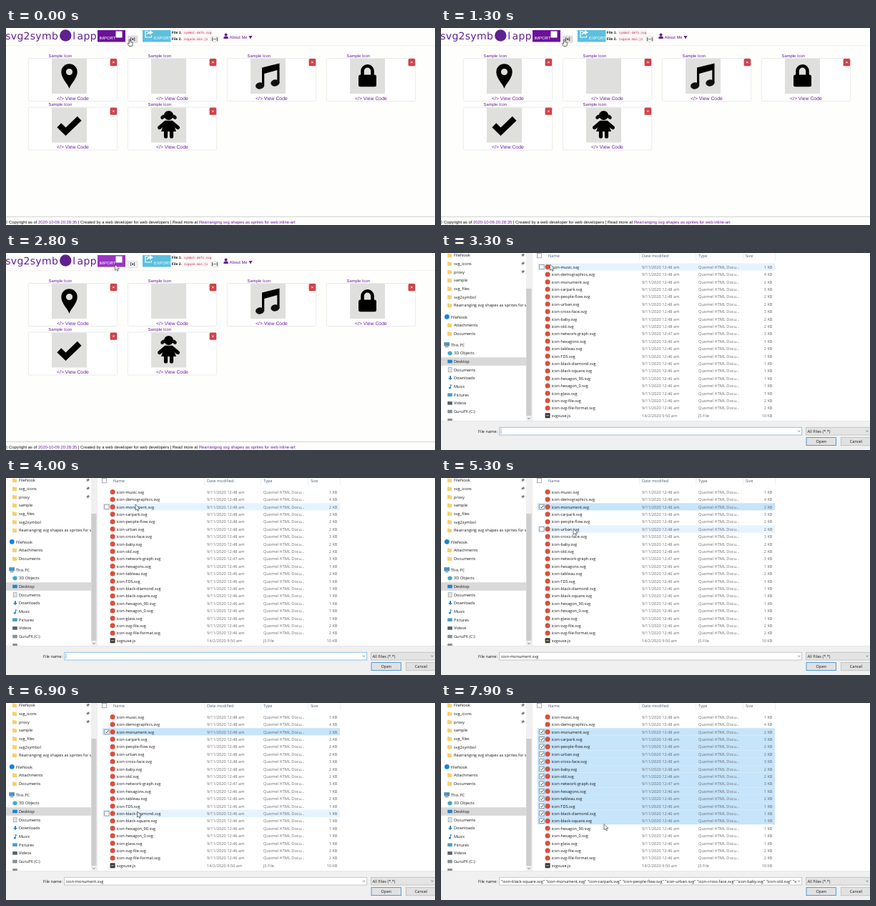
These frames come from a looping animation (600x276 px, 8000 ms). An HTML page:

```html
<!DOCTYPE html>
<html lang="en">
<head>
<meta charset="utf-8">
<title>Icon import</title>
<style>
html, body { margin: 0; width: 100%; height: 100%; overflow: hidden; background: #fff; }
svg { display: block; width: 600px; height: 276px; }
text { text-rendering: geometricPrecision; white-space: pre; }
#page { font: 5.85px "Liberation Sans", Arial, sans-serif; fill: #111; }
#dialog { font: 5.65px "Open Sans", "Noto Sans", sans-serif; fill: #1a1a1a; }
.link { fill: #6a1b9a; }
.white { fill: #fff; }
.logo { font: 14px "DejaVu Sans", sans-serif; letter-spacing: .3px; fill: #61208f; }
.code { font: 4.25px "DejaVu Sans Mono", monospace; fill: #c7254e; }
.bold { font-weight: bold; font-size: 5px; }
.view { font-size: 6.85px; }
.dim { fill: #6d6d6d; }
.head { fill: #4c607a; }
.end { text-anchor: end; }
.mid { text-anchor: middle; }
</style>
</head>
<body>
<svg viewBox="0 0 600 276" xmlns="http://www.w3.org/2000/svg">
  <defs>
    <clipPath id="sideClip"><rect width="119" height="235"/></clipPath>
    <clipPath id="fieldClip"><rect x="83" y="244" width="414" height="12"/></clipPath>
  </defs>
  <g id="page"></g>
  <g id="dialog"></g>
  <g id="cursor" stroke-linejoin="round">
    <path id="arrow" d="M0 0V8.2L2 6.5 3.3 9.4 4.6 8.8 3.4 6H6Z" fill="#fff" stroke="#222" stroke-width=".6"/>
    <path id="hand" d="M-.8 .4Q0-.6.8.4V3.6L4 4.3V7L3.2 9.4H-1L-3 6 -2.2 5.2 -.8 6Z" fill="#fff" stroke="#222" stroke-width=".7"/>
  </g>
</svg>
<script>
const $ = id => document.getElementById(id);
const rect = (x, y, w, h, fill, more = '') =>
  `<rect x="${x}" y="${y}" width="${w}" height="${h}" fill="${fill}" ${more}/>`;
const text = (x, y, str, cls = '') => `<text x="${x}" y="${y}" class="${cls}">${str}</text>`;
const path = (d, fill, more = '') => `<path d="${d}" fill="${fill}" ${more}/>`;
const dot = (x, y, r, fill) => `<circle cx="${x}" cy="${y}" r="${r}" fill="${fill}"/>`;
const oval = (x, y, rx, ry, turn) =>
  `<ellipse rx="${rx}" ry="${ry}" transform="translate(${x} ${y}) rotate(${turn})"/>`;
const border = (color, width = .7) => `stroke="${color}" stroke-width="${width}"`;
const show = (el, on) => el.setAttribute('visibility', on ? 'visible' : 'hidden');

const article = 'Rearranging svg shapes as sprites for web inline-art';

// ---- Web page ----
const icons = {
  pin: path('M0 17.2C-2.5 10-11.2 3.5-11.2-6a11.2 11.2 0 0 1 22.4 0C11.2 3.5 2.5 10 0 17.2ZM-4.6-6a4.6 4.6 0 0 0 9.2 0a4.6 4.6 0 0 0-9.2 0Z', '#000', 'fill-rule="evenodd"'),
  blank: '',
  note: path('M-8.5-12L16-18V10H12.8V-8.5L-5.3-3.5V14H-8.5Z', '#000') +
    oval(-11.4, 13.4, 6.1, 4.7, -8) + oval(9.9, 9.4, 6.1, 4.7, -8),
  lock: rect(-12.5, -2, 25, 16.7, '#000', 'rx="2.5"') +
    path('M-7 0V-7.2a7 7 0 0 1 14 0V0', 'none', border('#000', 4.6)),
  check: path('M-14.2 .3L-5 9.3 14.2-9.3', 'none', border('#000', 8.3)),
  girl: dot(0, -13.6, 6.5, '#000') + oval(-8, -11.3, 3.6, 2.5, -40) + oval(8, -11.3, 3.6, 2.5, 40) +
    path('M-5-6.3H5L10.5 9H-10.5Z', '#000') +
    path('M-4.5-3.5L-12.8 3.5M4.5-3.5L12.8 3.5M-4 8V16M4 8V16', 'none', border('#000', 5.2) + ' stroke-linecap="round"')
};

function card(name, i) {
  const x = 31 + 139 * (i % 4), y = i < 4 ? 42.5 : 111;
  return text(x + 28.5, y - 1.8, 'Sample Icon', 'link') +
    rect(x + .3, y, 124.4, 60, '#fff', 'rx="2" ' + border('#ddd', .6)) +
    rect(x + 33, y + .5, 49, 49, '#dfdfdd') +
    `<g transform="translate(${x + 57.5} ${y + 25})">${icons[name]}</g>` +
    rect(x + 114.6, y + .5, 9.6, 10.3, '#cf424a', 'rx="1.5"') +
    path(`M${x + 118.2} ${y + 4.4}l2.4 2.4m0-2.4l-2.4 2.4`, 'none', border('#fff', .9)) +
    text(x + 40, y + 58, '&lt;/&gt; View Code', 'link view');
}

$('page').innerHTML =
  rect(0, 0, 600, 276, '#fefefd') + rect(0, 24, 600, 1, '#f1f1f0') +
  text(-.8, 16, 'svg2symb', 'logo') + dot(83.3, 10.5, 8.2, '#61208f') +
  text(93.3, 16, 'l', 'logo') + text(99.6, 16, 'app', 'logo') +
  rect(128, 3, 39, 16.5, '#6b109a', 'id="import"') +
  text(130.5, 16, 'IMPORT', 'white') + rect(153.5, 4.5, 9, 9, '#fff') +
  rect(170.5, 11, 13.5, 9.5, '#eee', 'id="dotButton" rx="1" ' + border('#ccc', .5)) +
  text(177.2, 17.4, '[●]', 'bold mid') +
  rect(191, 3, 39.5, 16.5, '#5bc0de') +
  path('M199 4.5H195V13H203.5V10.5', 'none', border('#fff', 1.2)) +
  path('M201 3L206 6.2 201 9.5V7.6Q198 7.6 197.5 10.5Q196.5 5 201 5Z', '#fff') +
  text(207, 15.7, 'EXPORT', 'white') +
  text(231.7, 8, 'File 1.', 'bold') + rect(247, 2.5, 41, 7.5, '#f9f2f4') + text(249, 7.8, 'symbol-defs.svg', 'code') +
  text(231.7, 17.2, 'File 2.', 'bold') + rect(247, 11.8, 36, 7.5, '#f9f2f4') + text(249, 17, 'svguse.min.js', 'code') +
  rect(286.5, 12, 11, 7.5, '#f4f4f4', 'rx="1" ' + border('#ccc', .5)) + text(292, 17.2, '[—]', 'bold mid') +
  dot(307.6, 9.6, 2, '#61208f') + path('M304.4 15V13.5Q304.6 11.5 307.6 11.5T310.8 13.5V15Z', '#61208f') +
  text(312.5, 15, 'About Me', 'link') + path('M339.5 11h5l-2.5 4.6Z', '#61208f') +
  ['pin', 'blank', 'note', 'lock', 'check', 'girl'].map(card).join('') +
  rect(0, 264, 600, 1, '#d4d4d4') +
  text(-1.9, 274, '© Copyright as of <tspan class="link">2020-10-09.20:28:35</tspan>' +
    ' | Created by a web developer for web developers | Read more at ' +
    `<tspan class="link">${article}</tspan>`);

// ---- File dialog ----
const pitch = 10.4, top0 = 14.4;
const files = ('music 8 1,demographics 8 4,monument 8 2,carpark 8 3,people-flow 8 2,urban 8 2,cross-face 8 3,' +
  'baby 8 2,old 8 2,network-graph 7 3,hexagons 6 1,tableau 6 2,TDS 6 1,black-diamond 6 1,black-square 6 1,' +
  'hexagon_90 6 1,hexagon_0 6 1,glass 6 1,svg-file 6 2,svg-file-format 6 2').split(',').map(s => {
  const [name, min, kb] = s.split(' ');
  return [`icon-${name}.svg`, `9/11/2020 12:4${min} am`, 'Quomel HTML Docu...', kb];
});
files.push(['svgxuse.js', '14/2/2020 9:50 am', 'JS File', 10]);

function fileRow([name, date, type, kb], i) {
  const y = top0 + pitch * i, base = y + 7.3;
  const icon = type === 'JS File'
    ? rect(145.6, y + 1.8, 7, 7, '#3b3b38', 'rx=".8"') + path(`M147 ${y + 5.4}h4`, 'none', border('#c9c29a', 1))
    : dot(149.1, y + 5.2, 3.5, '#d8503f');
  return rect(135, y, 332, pitch, '#fff', `id="row${i}"`) +
    `<g id="box${i}">` + rect(137.7, y + 2, 6.4, 6.4, '#fff', border('#666', .6)) +
    path(`M139 ${y + 5.2}l1.5 1.6 2.6-3.4`, 'none', `id="tick${i}" ` + border('#222', .8)) + '</g>' +
    icon + text(154.7, base, name) + text(281, base, date, 'dim') +
    text(360, base, type, 'dim') + text(463.5, base, kb + ' KB', 'dim end');
}

const folder = (x, y) => path(`M${x} ${y - 2.8}h2.2l.8.8h3v5h-6Z`, '#f6d06f');
const pin = y => path(`M115 ${y - 2.6}l2 2-1.6.6-.6 1.6-2.4-2.4 1.8-.5ZM113.4 ${y + .6}l-1.3 1.5`, '#777', border('#777', .4));

const drives = [['3D Objects', '#38a9c9'], ['Desktop', '#2383c6'], ['Documents', '#8a9aa6'], ['Downloads', '#2583d0'],
  ['Music', '#2583d0'], ['Pictures', '#4a9ec4'], ['Videos', '#55606b'], ['GuruPX (C:)', '#8b9094']];

function driveIcon(name, y, c) {
  if (name === 'Music') return path(`M13.5 ${y - 3}v5M13.5 ${y - 3}l2 2`, 'none', border(c, .9)) + dot(12.3, y + 2, 1.5, c);
  if (name === 'Downloads') return path(`M12 ${y - 3}h2v2.6h2L13 ${y + 2.6} 10 ${y - .4}h2Z`, c);
  if (name === '3D Objects') return path(`M12.5 ${y - 3}l3 1.5v3.2l-3 1.5-3-1.5v-3.2Z`, c);
  if (name === 'Documents') return rect(10.2, y - 3, 4.8, 6, '#fff', border(c, .8)) + path(`M11.3 ${y - 1}h2.6m-2.6 2h2.6`, 'none', border(c, .6));
  return rect(9.2, y - 2.3, 6.6, 4.6, c);
}

const side = ['FileNook', 'svg_icons', 'proxy', 'sample', 'svg_files', 'svg2symbol', article].map((s, i) => {
  const y = 3.3 + 11.65 * i;
  return folder(9, y) + text(18, y + 2, s) + (i < 3 ? pin(y) : '');
}).join('') +
  dot(8.3, 89.3, 3.4, '#1683d8') + text(14, 91.5, 'FileNook') +
  folder(9, 101) + text(18, 103, 'Attachments') + folder(9, 113) + text(18, 115, 'Documents') +
  rect(4.8, 125.6, 6.8, 4.4, '#3c9ad6', border('#456', .5)) + path('M6 131.6h4.4', 'none', border('#456', .8)) +
  text(14, 130.6, 'This PC') +
  rect(0, 146.2, 119, 11.6, '#d9d9d9') +
  drives.map(([s, c], i) => {
    const y = 140.3 + 11.68 * i;
    return driveIcon(s, y, c) + text(18, y + 2, s);
  }).join('') + rect(9.2, 232, 6.6, 3, '#8b9094');

$('dialog').innerHTML =
  rect(0, 0, 600, 276, '#fff') +
  `<g clip-path="url(#sideClip)">${side}</g>` +
  rect(119, 0, 8, 235, '#f0f0f0') + rect(119.3, 50, 7.2, 178, '#cdcdcd') +
  path('M121.3 230.8l1.7 1.8 1.7-1.8', 'none', border('#555', .8)) +
  rect(127, 0, .6, 235, '#e2e2e2') +
  [277, 356.5, 422, 467].map(x => rect(x, 0, .6, 10, '#e3e3e3')).join('') +
  rect(134.4, .4, 6.2, 6.4, '#fff', border('#777', .6)) +
  text(150, 6.4, 'Name', 'head') + text(281, 6.4, 'Date modified', 'head') +
  text(360, 6.4, 'Type', 'head') + text(426, 6.4, 'Size', 'head') +
  files.map(fileRow).join('') +
  rect(0, 235, 600, 41, '#f0f0f0') + rect(0, 235, 600, .6, '#dfdfdf') +
  text(79, 251.8, 'File name:', 'end') +
  rect(81.8, 244.2, 423, 10.8, '#fff', 'id="field" ' + border('#4a9fe0', .6)) +
  rect(83.7, 245.8, .5, 7.4, '#555', 'id="caret"') +
  `<g clip-path="url(#fieldClip)"><text id="value" x="84" y="251.8"></text></g>` +
  path('M499 248.6l1.6 1.8 1.6-1.8', 'none', border('#555')) +
  rect(510.5, 244.2, 95, 10.8, '#e4e4e4', border('#adadad', .6)) + text(512.5, 251.8, 'All Files (*.*)') +
  path('M594.5 248.6l1.6 1.8 1.6-1.8', 'none', border('#555')) +
  rect(511, 258.6, 41.6, 11, '#e1e1e1', border('#2a8ada', .8)) + text(531.8, 266.2, 'Open', 'mid') +
  rect(559.5, 258.4, 43, 11.4, '#e1e1e1', border('#adadad', .6)) + text(580.5, 266.2, 'Cancel', 'mid');

const rows = files.map((_, i) => ({ bg: $('row' + i), box: $('box' + i), tick: $('tick' + i) }));

// ---- Motion ----
const openAt = 2900, pickAt = 4700, rangeAt = 7500;
const first = 2, last = 14;
const track = [[0, 173, 16], [1200, 173, 16], [2200, 152.5, 16], [3300, 152.5, 16], [4000, 181, 37],
  [4800, 182, 39], [5300, 185, 71], [6900, 183.5, 152], [7300, 186, 163], [7500, 188, 164], [7900, 228, 169.5]];

function pointer(t) {
  const n = track.findIndex(k => k[0] >= t);
  if (n < 1) return track[0].slice(1);
  const [t0, x0, y0] = track[n - 1], [t1, x1, y1] = track[n];
  const p = (t - t0) / (t1 - t0), e = p * p * (3 - 2 * p);
  return [x0 + (x1 - x0) * e, y0 + (y1 - y0) * e];
}

const quoted = [files[last], ...files.slice(first, last)].map(f => `"${f[0]}"`).join(' ');

function draw(t) {
  const [x, y] = pointer(t), open = t >= openAt;
  const onDot = !open && x >= 170, onImport = !open && x < 167;
  const end = t >= rangeAt ? last : t >= pickAt ? first : -1;
  const hover = open ? Math.floor((y - top0) / pitch) : -1;

  $('dialog').style.display = open ? '' : 'none';
  $('import').setAttribute('fill', onImport ? '#9a35c4' : '#6b109a');
  $('dotButton').setAttribute('fill', onDot ? '#dedede' : '#f1f1f1');
  $('cursor').setAttribute('transform', `translate(${x} ${y})`);
  show($('hand'), onDot);
  show($('arrow'), !onDot);

  if (!open) return;
  rows.forEach((r, i) => {
    const picked = i >= first && i <= end;
    r.bg.setAttribute('fill', picked ? '#c6e4fa' : i === hover ? '#e5f3ff' : '#fff');
    r.box.style.display = picked || i === hover ? '' : 'none';
    r.tick.style.display = picked ? '' : 'none';
  });
  $('value').textContent = end === last ? quoted : end === first ? files[first][0] : '';
  $('field').setAttribute('stroke', end < 0 ? '#4a9fe0' : '#a5a5a5');
  show($('caret'), end < 0);
}

const start = performance.now();
function tick() {
  draw(Math.floor((performance.now() - start) % 8000 / 100) * 100);
  requestAnimationFrame(tick);
}
tick();
</script>
</body>
</html>
```
